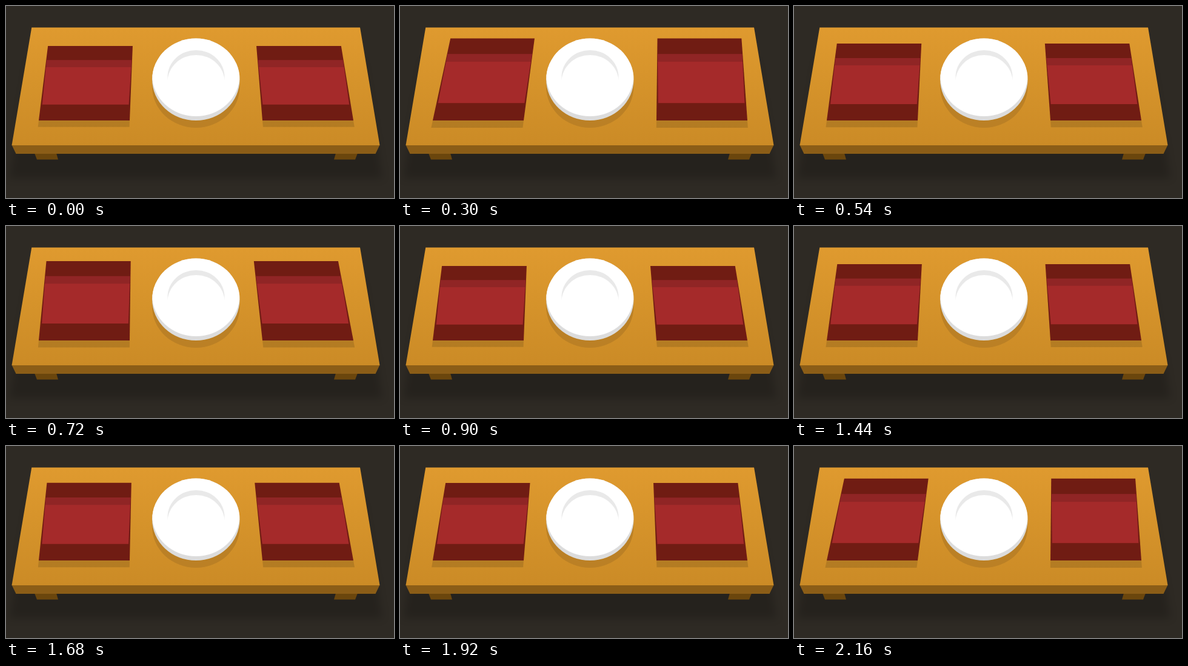
Write an HTML page that moves like this. It is 640 by 317 pixels and loops after 2.22 s.

```html
<!DOCTYPE html>
<html lang="en">
<head>
<meta charset="utf-8">
<title>Table with wobbling trays</title>
<style>
html, body { margin: 0; width: 100%; height: 100%; overflow: hidden; background: #2e2a24; }
svg { display: block; width: 640px; height: 317px; }
.dark { fill: #701c13; }
.floor { fill: #a52a2a; }
.shade { fill: #000; fill-opacity: .13; }
</style>
</head>
<body>
<svg viewBox="0 0 640 317">
  <defs>
    <linearGradient id="wood" x1="0" y1="0" x2="0" y2="1">
      <stop offset="0" stop-color="#df9a2f"/>
      <stop offset="1" stop-color="#cb8b26"/>
    </linearGradient>
    <filter id="soft" x="-10%" y="-10%" width="120%" height="120%">
      <feGaussianBlur stdDeviation="7"/>
    </filter>
    <clipPath id="rim"><ellipse cx="313.3" cy="121.3" rx="72.2" ry="67.8"/></clipPath>
  </defs>

  <path d="M38 90H588L621 285H5Z" fill="#000" opacity=".18" filter="url(#soft)"/>
  <path d="M47 243H83L86 253.5H51ZM544 243H580L576 253.5H541Z" fill="#6b460d"/>
  <path d="M9.5 229.5H616.5L609.5 244H16.5Z" fill="#8b5d17"/>
  <path d="M42.3 35.5H584L616.5 230H9.5Z" fill="url(#wood)"/>

  <g id="trays"></g>

  <ellipse cx="313.3" cy="133.2" rx="72.2" ry="67.8" fill="#bb8025"/>
  <ellipse cx="313.3" cy="121.3" rx="72.2" ry="67.8" fill="#dcdcdc"/>
  <ellipse cx="313.3" cy="114.3" rx="72.2" ry="67.8" fill="#fff" clip-path="url(#rim)"/>
  <ellipse cx="313.5" cy="117" rx="47" ry="44" fill="#e9e9e9"/>
  <ellipse cx="313.5" cy="125" rx="47" ry="44" fill="#fff"/>
</svg>
<script>
const LOOP = 2220, STEP = 60, CYCLE = 910;
const FRONT = 189, CENTER = 313.2, HORIZON = -1616;

// time in the wobble, sideways lean of the back edge, height
const wobble = [
  [0, -2.5, 123], [100, 2.8, 128], [230, 8.2, 134], [300, 9.8, 135.4],
  [340, 9.5, 135.2], [520, -0.1, 125.2], [560, -2.8, 128.7],
  [690, -7, 132.5], [860, -2.6, 123.3], [CYCLE, -2.5, 123]
];

const group = document.getElementById("trays");

function addPath(name) {
  const path = document.createElementNS("http://www.w3.org/2000/svg", "path");
  path.setAttribute("class", name);
  group.append(path);
  return path;
}

const trays = [[54, 204], [423, 573]].map(([left, right]) => ({
  left, right,
  shadow: addPath("shade"),
  box: addPath("dark"),
  floor: addPath("floor"),
  lip: addPath("shade")
}));

function poseAt(t) {
  const i = wobble.findIndex(p => p[0] > t);
  const a = wobble[i - 1], b = wobble[i];
  const k = (t - a[0]) / (b[0] - a[0]);
  return [a[1] + (b[1] - a[1]) * k, a[2] + (b[2] - a[2]) * k];
}

function draw(t) {
  const [lean, height] = poseAt(t % CYCLE);

  // v runs from the front edge (0) to the back edge (1)
  const point = (x, v, inset) => {
    const y = FRONT - height * v;
    const scale = (y - HORIZON) / (FRONT - HORIZON);
    const px = CENTER + (x - CENTER) * scale + lean * v + inset;
    return px.toFixed(2) + " " + y.toFixed(2);
  };
  const quad = (tray, back, front, inset = () => 0) =>
    "M" + [
      point(tray.left, back, inset(back)),
      point(tray.right, back, -inset(back)),
      point(tray.right, front, -inset(front)),
      point(tray.left, front, inset(front))
    ].join("L") + "Z";
  const wall = v => 3.2 - 3.1 * v;

  for (const tray of trays) {
    tray.shadow.setAttribute("d", quad(tray, 0, -0.088));
    tray.box.setAttribute("d", quad(tray, 1, 0));
    tray.floor.setAttribute("d", quad(tray, 0.811, 0.213, wall));
    tray.lip.setAttribute("d", quad(tray, 0.811, 0.716, wall));
  }
}

function tick() {
  const t = performance.now() % LOOP;
  draw(Math.floor(t / STEP) * STEP);
  requestAnimationFrame(tick);
}
tick();
</script>
</body>
</html>
```
